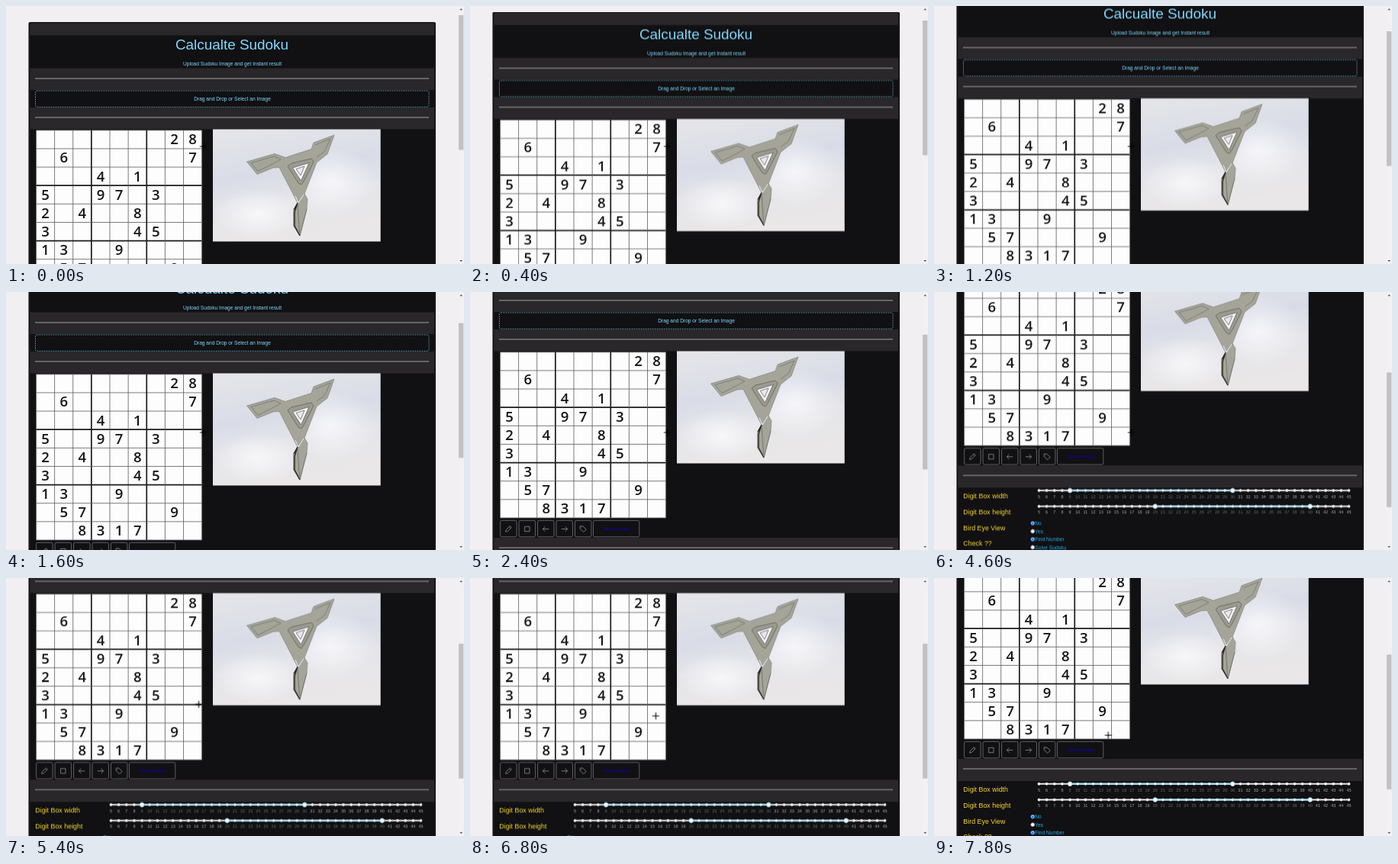
Write an HTML page that moves like this. It is 600x338 px and loops after 8000 ms.

```html
<!DOCTYPE html>
<html lang="en">
<head>
<meta charset="utf-8">
<title>Calcualte Sudoku</title>
<style>
  html, body { margin: 0; width: 100%; height: 100%; overflow: hidden; background: #f1eff2; }
  svg { display: block; width: 100vw; height: 100vh; }
  text { font-family: "Liberation Sans", Arial, sans-serif; }
  .digit { font: 600 18.6px "Open Sans", "Noto Sans", sans-serif; fill: #151515; }
</style>
</head>
<body>
<svg id="stage" viewBox="0 0 600 338" xmlns="http://www.w3.org/2000/svg">
  <defs>
    <linearGradient id="backdrop" x1="0" y1="0" x2="0.25" y2="1">
      <stop offset="0" stop-color="#e6e6e9"/>
      <stop offset="0.45" stop-color="#d9dce7"/>
      <stop offset="0.7" stop-color="#e5e5ea"/>
      <stop offset="1" stop-color="#e9e7e7"/>
    </linearGradient>
    <radialGradient id="glow">
      <stop offset="0" stop-color="#fbfbfd" stop-opacity=".8"/>
      <stop offset="1" stop-color="#fbfbfd" stop-opacity="0"/>
    </radialGradient>
  </defs>
  <g id="page"></g>
  <g id="bar"></g>
  <path id="cursor" d="M-4.5 0H4.5M0 -4.5V4.5" stroke="#000" stroke-width="1.1"/>
</svg>
<script>
const DURATION = 8000, STEP = 200;
const page = document.getElementById('page');
const bar = document.getElementById('bar');
const cursor = document.getElementById('cursor');

function add(parent, tag, attrs, content) {
  const el = document.createElementNS('http://www.w3.org/2000/svg', tag);
  for (const name in attrs) el.setAttribute(name, attrs[name]);
  if (content !== undefined) el.textContent = content;
  parent.appendChild(el);
  return el;
}
const rect = (x, y, width, height, fill, more) =>
  add(page, 'rect', { x, y, width, height, fill, ...more });
const path = (d, stroke, width = 1, fill = 'none') =>
  add(page, 'path', { d, stroke, 'stroke-width': width, fill });
const dot = (cx, cy, r, fill, stroke, width = 1) =>
  add(page, 'circle', { cx, cy, r, fill, stroke, 'stroke-width': width });
const text = (x, y, size, fill, content, anchor = 'start') =>
  add(page, 'text', { x, y, fill, 'font-size': size, 'text-anchor': anchor }, content);

function drawPanels() {
  const dark = '#111013', cyan = '#7fdbff';
  rect(29.5, 21, 533.5, 640, '#171619', { rx: 2 });
  rect(31.5, 22.5, 529.5, 638, '#292729');
  for (const [top, bottom] of [[38.5, 81.5], [110, 133], [161.5, 406], [435, 660]])
    rect(31.5, top, 529.5, bottom - top, dark);
  for (const y of [95, 146, 419]) rect(38, y - .5, 516, 1, '#a3a2a3');
  text(296, 57, 18.9, cyan, 'Calcualte Sudoku', 'middle');
  text(296.5, 78.4, 6.62, cyan, 'Upload Sudoku Image and get Instant result', 'middle');
  rect(38.5, 111, 515.5, 21.3, 'none',
    { rx: 2, stroke: '#62b4c8', 'stroke-width': .8, 'stroke-dasharray': '1.8 1.2' });
  text(296.5, 124.4, 6.62, cyan, 'Drag and Drop or Select an Image', 'middle');
}

function drawSudoku() {
  const left = 39.5, top = 162.8, cell = 24.13, size = cell * 9;
  const rows = ['.......28', '.6......7', '...4.1...', '5..97.3..', '2.4..8...',
    '3....45..', '13..9....', '.57....9.', '..8317...'];
  rect(left, top, size, size, '#fdfdfd');
  for (let i = 0; i <= 9; i++) {
    const inner = i % 9 > 0, heavy = inner && i % 3 === 0;
    const color = heavy ? '#1c1c1c' : '#5a5a5a', width = heavy ? 1.7 : .8;
    path(`M${left + i * cell} ${top}v${size}M${left} ${top + i * cell}h${size}`, color, width);
  }
  rows.forEach((row, r) => [...row].forEach((value, c) => {
    if (value === '.') return;
    add(page, 'text', { class: 'digit', 'text-anchor': 'middle',
      x: left + (c + .5) * cell, y: top + (r + .5) * cell + 6.4 }, value);
  }));
}

function drawModel() {
  rect(271, 161.5, 219.7, 147, 'url(#backdrop)');
  add(page, 'ellipse', { cx: 330, cy: 272, rx: 58, ry: 34, fill: 'url(#glow)' });
  add(page, 'ellipse', { cx: 425, cy: 230, rx: 60, ry: 45, fill: 'url(#glow)' });
  path('M315.5 204L352 193.5L366 198.5L400 187.5L403 179L430 169L421 194L407 205' +
    'L391 246L395 253L394 266L385 301L376.5 288V268L382 258L358 211.5L350 212L329 220.5Z',
    '#85847b', .7, '#a5a499');
  path('M321 205.5L351 197L360 201L347 208L330 216.5ZM405 182L425 174L417 191L407 198', '#77766e', .8);
  path('M369 210L374 206L400 200L403 204L391 228L387 234L383 232Z', '#696860', .9, '#9b9a90');
  path('M375.5 212L397 205.5L386.5 229Z', '#65645d', .8, '#f5f5f8');
  path('M380 213.5L391 210L386 222Z', '#77766e', .9, '#e8e9ef');
  path('M377 267L382 258L378 270V288L385 301', '#25251f', 1.4);
  path('M382 259L384.5 297M385 301L394 266', '#66655d', .7);
  path('M379 249L383 258L390 247', '#f0f0f2', 1);
}

function drawToolbar() {
  const top = 383.3, gray = '#858487';
  const icons = [
    'M-3.7 3.7L-3 1L2 -4L4 -2L-1 3ZM1 -3L3 -1',
    'M-3.2 -3.2H3.2V3.2H-3.2Z',
    'M4 0H-4M-.8 -3.2L-4 0L-.8 3.2',
    'M-4 0H4M.8 -3.2L4 0L.8 3.2',
    'M-4 -3.7H-.3L4 .6L.6 4L-4 -.3ZM-2.4 -2.2h.6'
  ];
  const frame = (x, width) =>
    rect(x, top, width, 21.5, 'none', { rx: 1.8, stroke: '#69686b', 'stroke-width': .9 });
  icons.forEach((d, i) => {
    const x = 39.7 + i * 24.45;
    frame(x, 21.4);
    path(d, gray, .9).setAttribute('transform', `translate(${x + 10.7} ${top + 11.2})`);
  });
  frame(161.5, 60.3);
  text(191.5, 396, 6, '#0b00d0', 'Save Answer', 'middle');
}

function drawSlider(y, from, to) {
  const at = value => 137.5 + (value - 5) * 10.15;
  rect(at(5), y - 1, at(45) - at(5), 2, '#e9e9e9');
  rect(at(from), y - 1, at(to) - at(from), 2, '#abe2fb');
  for (let value = 5; value <= 45; value++) {
    const active = value >= from && value <= to;
    dot(at(value), y, 1.5, '#fff', active ? '#b5e8f8' : '#f2f2ed', .8);
    text(at(value), y + 9.9, 5.5, active ? '#69696a' : '#aaa9a9', value, 'middle');
  }
  for (const value of [from, to]) dot(at(value), y, 2.8, '#fff', '#96dbfa', 1);
}

function drawControls() {
  ['Digit Box width', 'Digit Box height', 'Bird Eye View', 'Check ??']
    .forEach((label, i) => text(38.3, 449 + i * 20.8, 8.88, '#f7d72e', label));
  drawSlider(438.7, 9, 30);
  drawSlider(459.5, 20, 40);
  ['No', 'Yes', 'Find Number', 'Solve Sudoku'].forEach((label, i) => {
    const y = 481.7 + i * 10.5;
    const checked = i % 2 === 0;
    dot(129.3, y, 2.4, '#fff', checked ? '#1b79e8' : '#a0a0a0', .8);
    if (checked) dot(129.3, y, 1.5, '#1673e6', 'none');
    text(132.3, y + 2.7, 6.65, '#25aee0', label);
  });
}

drawPanels();
drawSudoku();
drawModel();
drawToolbar();
drawControls();

add(bar, 'rect', { x: 592, y: 0, width: 8, height: 338, fill: '#f1f1f1' });
add(bar, 'path', { d: 'M594.2 5.2L596.2 3.2L598.2 5.2ZM594.2 333L596.2 335L598.2 333Z', fill: '#555' });
const thumb = add(bar, 'rect', { x: 593, y: 12, width: 6.3, height: 176.5, fill: '#c1c1c1' });

// Each row holds a time and its values; moves advance once per STEP.
function play(el, table, transform) {
  const frames = table.map(([time, ...values], i) => {
    const next = i + 1 < table.length ? table[i + 1][0] : time + STEP;
    return {
      offset: time / DURATION,
      transform: transform(...values),
      easing: `steps(${Math.max(1, (next - time) / STEP)}, end)`
    };
  });
  el.animate(frames, { duration: DURATION, iterations: Infinity });
}

const scroll = [[0, 0], [1200, 40.5], [2400, 84], [3400, 174], [4600, 178.7],
  [5400, 141.7], [7200, 141.7], [7800, 169], [8000, 169]];
const pointer = [[0, 258.5, 184], [4600, 258.5, 184], [5400, 252.5, 165.5],
  [6200, 252.5, 165.5], [7800, 228.3, 206], [8000, 228.3, 206]];

play(page, scroll, y => `translate(0px, ${-y}px)`);
play(thumb, scroll, y => `translate(0px, ${y * .523}px)`);
play(cursor, pointer, (x, y) => `translate(${x}px, ${y}px)`);
</script>
</body>
</html>
```
